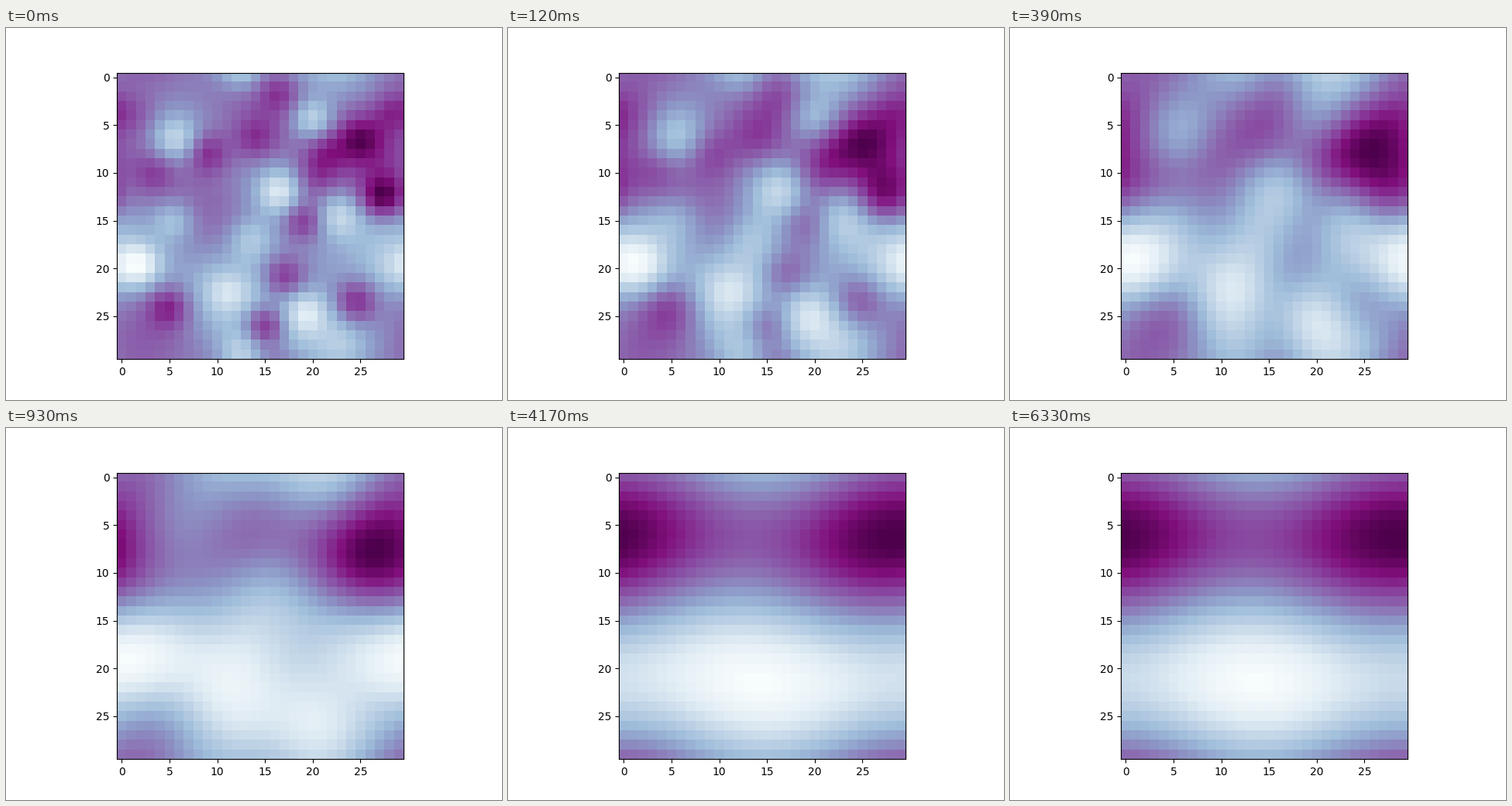
Animation of 640 by 480 pixels, one loop 8000 ms. Source, as a matplotlib script:

```python
import numpy as np
import matplotlib.pyplot as plt
from matplotlib.animation import FuncAnimation

N = 30                # cells per side, wrapping at the edges
D = 0.25              # diffusion per step
STEP_MS = 30
INTERVAL, FRAMES = 40, 200
MEAN = 0.54

# where the starting field peaks and dips, by heat level
SPOTS = {
    1.00: [(25, 6.5), (27.3, 12.6)],
    0.86: [(28.5, 3.5), (21.3, 8), (27, 9.3)],
    0.76: [(16.5, 1.5), (1.5, 4), (3.5, 10), (9, 8), (14, 6.5), (20.2, 10.8),
           (19, 15), (17, 21), (5, 24), (24.5, 23.5), (15, 26)],
    0.33: [(20, 4.5), (5.7, 6.5), (22.8, 14.5), (13.5, 17), (5.5, 15),
           (12.5, 29), (23, 28)],
    0.20: [(16.5, 12), (28.8, 20), (11, 22.5), (19.3, 24.7)],
    0.00: [(1.8, 19.7)],
}


def decay_rate(kx, ky):
    w = 2 * np.pi / N
    return D * (4 - 2 * np.cos(w * kx) - 2 * np.cos(w * ky))


def slow_part(x, y):
    """The broad waves that outlast everything else."""
    def wave(kx, ky, size, shift):
        return size * np.cos(2 * np.pi / N * (kx * x + ky * y - shift))

    return (MEAN + wave(0, 1, 0.105, 6.3) + wave(1, 0, 0.034, 28.5)
            + wave(1, 1, 0.044, 33.4)
            + wave(2, 1, 0.034, 0.5) + wave(1, -2, 0.062, 9.3))


def bump(x, y, cx, cy):
    dx = (x - cx + N / 2) % N - N / 2
    dy = (y - cy + N / 2) % N - N / 2
    return np.exp(-(dx**2 + dy**2) / 5)


def start_spectrum():
    sx, sy, heat = np.array([(x, y, level) for level, points in SPOTS.items()
                             for x, y in points]).T
    kernel = bump(sx[:, None], sy[:, None], sx, sy) + 0.02 * np.eye(len(sx))
    weights = np.linalg.solve(kernel, heat - slow_part(sx, sy))
    y, x = np.mgrid[:N, :N].astype(float)
    detail = bump(x[..., None], y[..., None], sx, sy) @ weights
    # the detail must not disturb the broadest waves
    fine = KX**2 + KY**2 > 2
    return np.fft.fft2(slow_part(x, y)) + fine * np.fft.fft2(detail)


KY, KX = np.meshgrid(*[np.fft.fftfreq(N, 1 / N)] * 2, indexing="ij")
RATE = decay_rate(KX, KY)
START = start_spectrum()


def field(i):
    steps = i * INTERVAL / STEP_MS
    return np.fft.ifft2(START * np.exp(-RATE * steps)).real


fig, ax = plt.subplots(figsize=(6.4, 4.8), dpi=100)
image = ax.imshow(field(0), cmap="BuPu")


def update(i):
    u = field(i)
    image.set_data(u)
    image.set_clim(u.min(), u.max())
    return [image]


anim = FuncAnimation(fig, update, frames=FRAMES, interval=INTERVAL,
                     repeat=True, repeat_delay=0)
plt.show()
```
